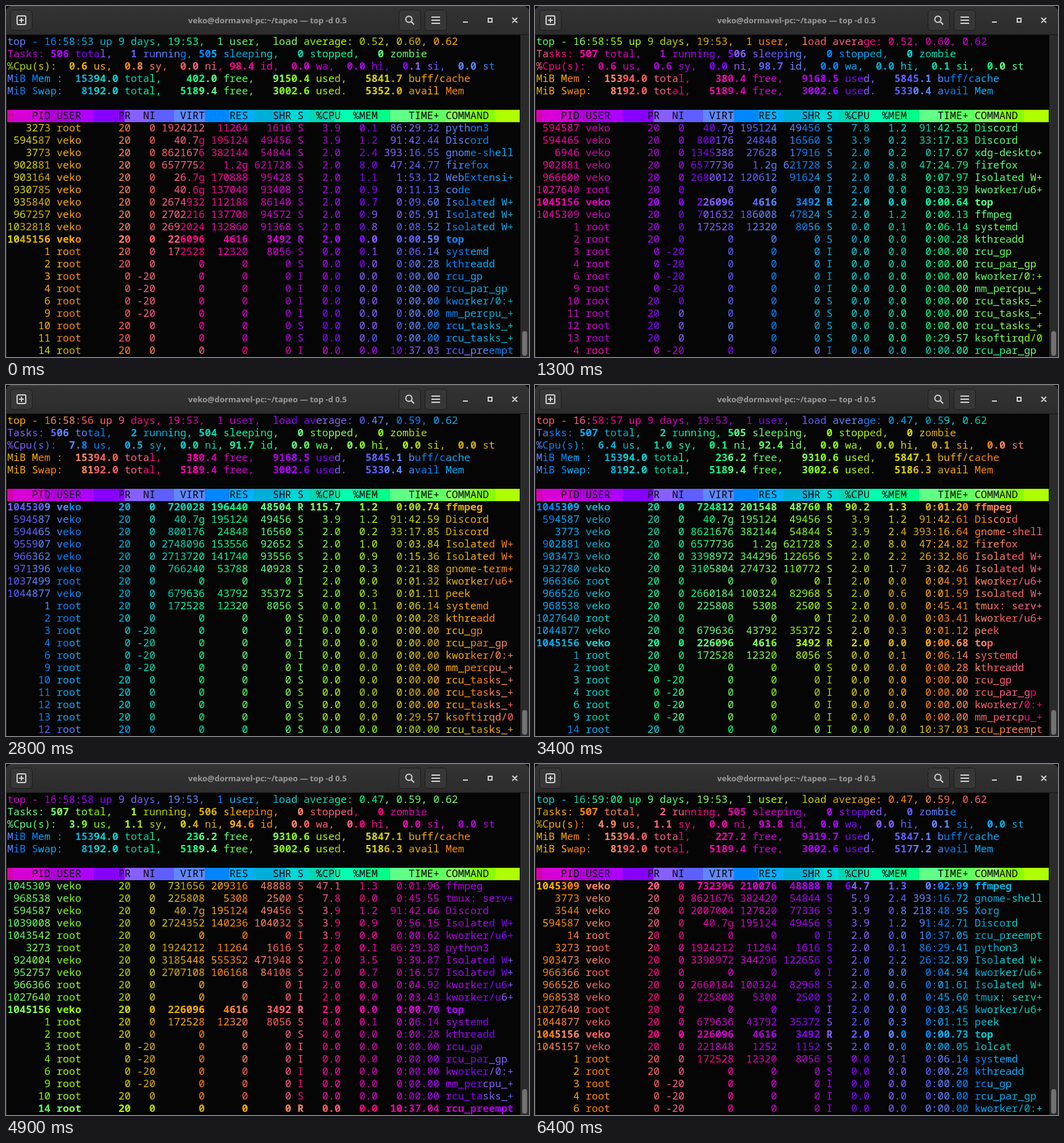
Animation of 847 by 568 pixels, one loop 6.6 s. Source, as an HTML page:

```html
<!DOCTYPE html>
<html lang="en">
<head>
<meta charset="utf-8">
<title>Terminal</title>
<style>
html, body { margin: 0; width: 100%; height: 100%; overflow: hidden; background: #000; }
#win { position: absolute; left: 0; top: 0; width: 847px; height: 568px; overflow: hidden; background: #2b2b2b; border-radius: 9px 9px 0 0; }
#bar { position: absolute; left: 0; top: 0; width: 847px; height: 46px; background: linear-gradient(#333, #2c2c2c); box-shadow: inset 0 1px #444; border-bottom: 1px solid #161616; }
#title { position: absolute; left: 0; width: 847px; top: 0; line-height: 46px; text-align: center; font: bold 13px/46px "Open Sans", "Noto Sans", sans-serif; color: #9c9c9c; }
#bar svg { position: absolute; left: 0; top: 0; }
#term { position: absolute; left: 1px; top: 47px; width: 832px; height: 521px; background: #050505; }
#thumb { position: absolute; left: 836px; top: 526px; width: 8px; height: 40px; border-radius: 4px; background: #727272; }
#rows div { position: absolute; left: 2px; height: 20px; }
#rows span { position: absolute; top: 0; height: 20px; white-space: pre; font: 16.667px/18px "Noto Sans Mono", "DejaVu Sans Mono", monospace; }
#rows .b { font-weight: bold; }
</style>
</head>
<body>
<div id="win">
  <div id="bar">
    <div id="title">veko@dormavel-pc:~/tapeo — top -d 0.5</div>
    <svg width="847" height="46" fill="none" stroke="#d2d2d2" stroke-width="2">
      <g fill="#373737" stroke="#1c1c1c" stroke-width="1">
        <rect x="7.5" y="6.5" width="35" height="33" rx="5"/>
        <rect x="636.5" y="6.5" width="35" height="33" rx="5"/>
        <rect x="678.5" y="6.5" width="35" height="33" rx="5"/>
      </g>
      <rect x="18" y="16" width="14" height="14" rx="2"/>
      <path d="M21 23h8M25 19v8M656 25l5 5M689 18h14M689 23h14M689 28h14M740 26h8M820 19l8 8M828 19l-8 8"/>
      <circle cx="652.5" cy="21.5" r="5"/>
      <rect x="781" y="20" width="6" height="6"/>
    </svg>
  </div>
  <div id="term"></div>
  <div id="thumb"></div>
  <div id="rows"></div>
</div>
<script>
const LOOP = 6600;
const STARTS = [0, 200, 700, 1300, 1800, 2300, 2800, 3400, 3900, 4400, 4900, 5400, 5900, 6400];
const USER = 'veko';

// xterm colour codes, one full turn of the rainbow
const CODES = [39, 38, 44, 43, 49, 48, 84, 83, 119, 118, 154, 148, 184, 178, 214,
  208, 209, 203, 204, 198, 199, 163, 164, 128, 129, 93, 99, 63, 69, 33];
const level = v => v ? 55 + 40 * v : 0;
const COLORS = CODES.map(c => {
  const n = c - 16;
  return `rgb(${level(n / 36 | 0)},${level((n / 6 | 0) % 6)},${level(n % 6)})`;
});

// pid: virt res shr mem command (users' processes, then root's)
const parse = (text, owner) => text.trim().split('\n').map(line => {
  const [pid, virt, res, shr, mem, ...cmd] = line.trim().split(' ');
  return [pid, { owner, virt, res, shr, mem, cmd: cmd.join(' ') }];
});
const PROCS = Object.fromEntries([...parse(`
  594587 40.7g 195124 49456 1.2 Discord
  594465 800176 24848 16560 0.2 Discord
  3773 8621676 382144 54844 2.4 gnome-shell
  3544 2007004 127820 77336 0.8 Xorg
  6946 1345388 27628 17916 0.2 xdg-deskto+
  902881 6577736 1.2g 621728 8.0 firefox
  903164 26.7g 170888 95428 1.1 WebExtensi+
  930785 40.6g 137048 93408 0.9 code
  935840 2674932 112188 86140 0.7 Isolated W+
  967257 2702216 137708 94572 0.9 Isolated W+
  1032818 2692024 132860 91368 0.8 Isolated W+
  966600 2680012 120612 91624 0.8 Isolated W+
  955907 2748096 153556 92652 1.0 Isolated W+
  966362 2713720 141740 93556 0.9 Isolated W+
  932780 3105804 274732 110772 1.7 Isolated W+
  1039008 2724352 140236 104032 0.9 Isolated W+
  924004 3185448 555352 471948 3.5 Isolated W+
  952757 2707108 106168 84108 0.7 Isolated W+
  903257 2753120 144872 93752 0.9 Isolated W+
  903473 3398972 344296 122656 2.2 Isolated W+
  966526 2660184 100324 82968 0.6 Isolated W+
  971396 766240 53788 40928 0.3 gnome-term+
  1044877 679636 43792 35372 0.3 peek
  968538 225808 5308 2500 0.0 tmux: serv+
  1045156 226096 4616 3492 0.0 top
  1045157 221848 1252 1152 0.0 lolcat
  1045309 732396 209812 48888 1.3 ffmpeg`, USER), ...parse(`
  3273 1924212 11264 1616 0.1 python3
  1 172528 12320 8056 0.1 systemd
  2 0 0 0 0.0 kthreadd
  3 0 0 0 0.0 rcu_gp
  4 0 0 0 0.0 rcu_par_gp
  6 0 0 0 0.0 kworker/0:+
  9 0 0 0 0.0 mm_percpu_+
  10 0 0 0 0.0 rcu_tasks_+
  11 0 0 0 0.0 rcu_tasks_+
  12 0 0 0 0.0 rcu_tasks_+
  13 0 0 0 0.0 ksoftirqd/0
  14 0 0 0 0.0 rcu_preempt
  966366 0 0 0 0.0 kworker/u6+
  1027640 0 0 0 0.0 kworker/u6+
  1037499 0 0 0 0.0 kworker/u6+
  1043542 0 0 0 0.0 kworker/u6+`, 'root')]);

// clock, tasks, running, us, sy, ni, id, si; then: pid cpu time [state virt res shr mem]
const STATES = `
58:53 506 1 0.6 0.8 0.0 98.4 0.1|3273 3.9 86:29.32|594587 3.9 91:42.44|3773 2.0 393:16.55|902881 2.0 47:24.77 S 6577752|903164 2.0 1:53.12|930785 2.0 0:11.13|935840 2.0 0:09.60|967257 2.0 0:05.91|1032818 2.0 0:08.52|1045156 2.0 0:00.59
58:54 506 2 1.1 0.7 0.0 98.1 0.1|594587 3.9 91:42.46|3273 2.0 86:29.33|3773 2.0 393:16.56|594465 2.0 33:17.80|902881 2.0 47:24.78|966362 2.0 0:15.34|971396 2.0 0:21.86|1044877 2.0 0:01.09|1045156 2.0 0:00.61
58:54 507 2 2.3 1.0 0.0 96.6 0.1|1045309 23.5 0:00.13 S 701632 186008 47824 1.2|594587 3.9 91:42.48|3773 3.9 393:16.58|3273 2.0 86:29.34|3544 2.0 218:48.85|594465 2.0 33:17.81|903257 2.0 0:05.97|903473 2.0 26:32.85|930785 2.0 0:11.14|955907 2.0 0:03.83|968538 2.0 0:45.39|971396 2.0 0:21.87|1037499 2.0 0:01.31|1044877 2.0 0:01.10|1045156 2.0 0:00.63
58:55 507 1 0.6 0.6 0.0 98.7 0.1|594587 7.8 91:42.52|594465 3.9 33:17.83|6946 2.0 0:17.67|902881 2.0 47:24.79|966600 2.0 0:07.97|1027640 2.0 0:03.39|1045156 2.0 0:00.64|1045309 2.0 0:00.13 S 701632 186008 47824 1.2
58:55 506 1 0.9 0.5 0.0 98.5 0.1|594587 5.9 91:42.55|3273 2.0 86:29.35|3773 2.0 393:16.60|594465 2.0 33:17.84|902881 2.0 47:24.80|903164 2.0 1:53.13|968538 2.0 0:45.40|1045156 2.0 0:00.65|1045309 2.0 0:00.14 S 701632 186008 47824 1.2
58:56 507 1 1.2 0.8 0.1 97.9 0.0|594587 3.9 91:42.57|1045309 3.9 0:00.16 S 701632 186008 47824 1.2|3273 2.0 86:29.36|3773 2.0 393:16.61|902881 2.0 47:24.81|924004 2.0 9:39.85|930785 2.0 0:11.15|1027640 2.0 0:03.40|1043542 2.0 0:00.58|1045156 2.0 0:00.66
58:56 506 2 7.8 0.5 0.0 91.7 0.0|1045309 115.7 0:00.74 R 720028 196440 48504 1.2|594587 3.9 91:42.59|594465 2.0 33:17.85|955907 2.0 0:03.84|966362 2.0 0:15.36|971396 2.0 0:21.88|1037499 2.0 0:01.32|1044877 2.0 0:01.11
58:57 507 2 6.4 1.0 0.1 92.4 0.1|1045309 90.2 0:01.20 R 724812 201548 48760 1.3|594587 3.9 91:42.61|3773 3.9 393:16.64|902881 2.0 47:24.82|903473 2.0 26:32.86|932780 2.0 3:02.46|966366 2.0 0:04.91|966526 2.0 0:01.59|968538 2.0 0:45.41|1027640 2.0 0:03.41|1044877 2.0 0:01.12|1045156 2.0 0:00.68
58:57 507 1 4.6 1.4 0.4 93.7 0.0|1045309 48.0 0:01.45 S 728076 205740|968538 22.0 0:45.51|3273 4.0 86:29.37|1027640 4.0 0:03.42|1043542 4.0 0:00.60|594465 2.0 33:17.86|594587 2.0 91:42.62|932780 2.0 3:02.47|1037499 2.0 0:01.33|1045156 2.0 0:00.69
58:58 507 2 5.1 0.9 0.2 93.8 0.0|1045309 52.9 0:01.72 S 730104 207680|594587 3.9 91:42.64|594465 2.0 33:17.87|902881 2.0 47:24.83|968538 2.0 0:45.52|1039008 2.0 0:56.13|1043542 2.0 0:00.61|1044877 2.0 0:01.13|14 0.0 10:37.04 R
58:58 507 1 3.9 1.1 0.4 94.6 0.0|1045309 47.1 0:01.96 S 731656 209316|968538 7.8 0:45.55|594587 3.9 91:42.66|1039008 3.9 0:56.15|1043542 3.9 0:00.62|3273 2.0 86:29.38|924004 2.0 9:39.87|952757 2.0 0:16.57|966366 2.0 0:04.92|1027640 2.0 0:03.43|1045156 2.0 0:00.70
58:59 507 3 6.3 0.7 0.0 93.0 0.0|1045309 92.2 0:02.43|3273 3.9 86:29.40 R|594465 3.9 33:17.89|594587 3.9 91:42.68|902881 2.0 47:24.84|903257 2.0 0:05.99|971396 2.0 0:21.89|1045156 2.0 0:00.71
58:59 507 1 4.3 1.2 0.1 94.3 0.1|1045309 45.1 0:02.66|3773 5.9 393:16.69|968538 5.9 0:45.59|3544 3.9 218:48.93|594587 2.0 91:42.69|594465 2.0 33:17.90|902881 2.0 47:24.85|903473 2.0 26:32.88|966366 2.0 0:04.93|966526 2.0 0:01.60|1027640 2.0 0:03.44|1044877 2.0 0:01.14|1045156 2.0 0:00.72|1045157 2.0 0:00.04
59:00 507 2 4.9 1.1 0.0 93.8 0.1|1045309 64.7 0:02.99 R 732396 210076|3773 5.9 393:16.72 S 8621676 382420|3544 3.9 218:48.95|594587 3.9 91:42.71|14 2.0 10:37.05|3273 2.0 86:29.41|903473 2.0 26:32.89|966366 2.0 0:04.94|966526 2.0 0:01.61|968538 2.0 0:45.60|1027640 2.0 0:03.45|1044877 2.0 0:01.15|1045156 2.0 0:00.73|1045157 2.0 0:00.05
`.trim().split('\n').map(s => s.split('|'));

const IDLE = [1, 2, 3, 4, 6, 9, 10, 11, 12, 13, 14];
const IDLE_TIME = { 1: '0:06.14', 2: '0:00.28', 13: '0:29.57', 14: '10:37.03' };
const MEM = [
  ['402.0', '9150.4', '5841.7', '5352.0'],
  ['380.4', '9168.5', '5845.1', '5330.4'],
  ['236.2', '9310.6', '5847.1', '5186.3'],
  ['227.2', '9319.7', '5847.1', '5177.2']];
const HEADER = '    PID USER      PR  NI    VIRT    RES    SHR S  %CPU  %MEM     TIME+ COMMAND'.padEnd(83);

function procLine(entry) {
  const [pid, cpu, time, state, ...own] = entry.split(' ');
  const p = PROCS[pid];
  const [virt = p.virt, res = p.res, shr = p.shr, mem = p.mem] = own;
  const sleep = /^(rcu_(gp|par|pre)|kworker|mm_)/.test(p.cmd) ? 'I' : 'S';
  const high = [3, 4, 6, 9].includes(+pid);
  return [pid.padStart(7), p.owner.padEnd(9), high ? ' 0' : '20', high ? '-20' : '  0',
    virt.padStart(7), res.padStart(6), shr.padStart(6),
    state || (p.cmd == 'top' ? 'R' : sleep),
    cpu.padStart(5), mem.padStart(5), time.padStart(9), p.cmd].join(' ');
}

function procList([, ...busy]) {
  const ids = busy.map(e => +e.split(' ')[0]);
  const idle = IDLE.filter(id => !ids.includes(id))
    .map(id => `${id} 0.0 ${IDLE_TIME[id] || '0:00.00'}`);
  // a waking kernel thread without load stays among the idle ones
  const woken = busy.filter(e => e.startsWith('14 0.0'));
  return [...busy.filter(e => !woken.includes(e)), ...idle, ...woken].map(procLine);
}

function summary([head], n) {
  const [clock, tasks, running, us, sy, ni, id, si] = head.split(' ');
  const [free, used, cache, avail] = MEM[Math.floor((n + 5) / 6)];
  const load = n < 6 ? '0.52, 0.60, 0.62' : '0.47, 0.59, 0.62';
  const pct = (v, name) => v.padStart(5) + ' ' + name;
  return [
    `top - 16:${clock} up 9 days, 19:53,  1 user,  load average: ${load}`,
    `Tasks: ${tasks} total,   ${running} running, ${tasks - running} sleeping,   0 stopped,   0 zombie`,
    '%Cpu(s):' + [pct(us, 'us'), pct(sy, 'sy'), pct(ni, 'ni'), pct(id, 'id'),
      pct('0.0', 'wa'), pct('0.0', 'hi'), pct(si, 'si'), pct('0.0', 'st')].join(','),
    `MiB Mem :  15394.0 total, ${free.padStart(8)} free,   ${used} used,   ${cache} buff/cache`,
    `MiB Swap:   8192.0 total,   5189.4 free,   3002.6 used.   ${avail} avail Mem`,
    '', HEADER];
}

// Only rows whose text changed are reprinted; the others keep their old colours.
// The bottom row shows up one refresh late, and the top row continues its colours.
const FIRST_PHASE = { 0: 28.3, 1: 22.6, 3: 28.85, 4: 28.95, 6: 21.84 };
let last = procLine('14 0.0 10:37.03');
const SCREENS = [];
STATES.forEach((state, n) => {
  const list = procList(state);
  const lines = [...summary(state, n), ...list.slice(0, 18), last];
  last = list[18];
  SCREENS.push(lines.map((text, r) => {
    const old = n ? SCREENS[n - 1][r] : { phase: FIRST_PHASE[r], text };
    if (old.phase !== undefined && old.text == text) return old;
    const row = r == 25 ? 0 : r;
    return { text, phase: 11.07 + 2.5 * n + 0.1 * row + (r ? 0 : 18.45) };
  }));
});

function isBold(text, r, c) {
  if (r > 6) return text[47] == 'R';
  if (r < 1 || r > 4) return false;
  return /\d/.test(text[c]) || text[c] == '.' && /\d/.test(text[c - 1]);
}

function rowHtml({ text, phase }, r) {
  const runs = [];
  let run = {};
  [...text].forEach((ch, c) => {
    const color = COLORS[Math.floor(phase + 0.23 * c) % 30];
    const bold = isBold(text, r, c);
    if (color != run.color || bold != run.bold) runs.push(run = { c, color, bold, s: '' });
    run.s += ch;
  });
  const spans = runs.map(({ c, color, bold, s }) => {
    const paint = r == 6 ? `color:#050505;background:${color};width:${s.length * 10}px` : `color:${color}`;
    return `<span class="${bold ? 'b' : ''}" style="left:${c * 10}px;${paint}">${s}</span>`;
  });
  return `<div style="top:${48 + 20 * r}px">${spans.join('')}</div>`;
}

const rowsBox = document.getElementById('rows');
let shown = -1;
function draw() {
  const t = performance.now() % LOOP;
  const n = STARTS.filter(s => s <= t).length - 1;
  if (n != shown) rowsBox.innerHTML = SCREENS[shown = n].map(rowHtml).join('');
  requestAnimationFrame(draw);
}
draw();
</script>
</body>
</html>
```
